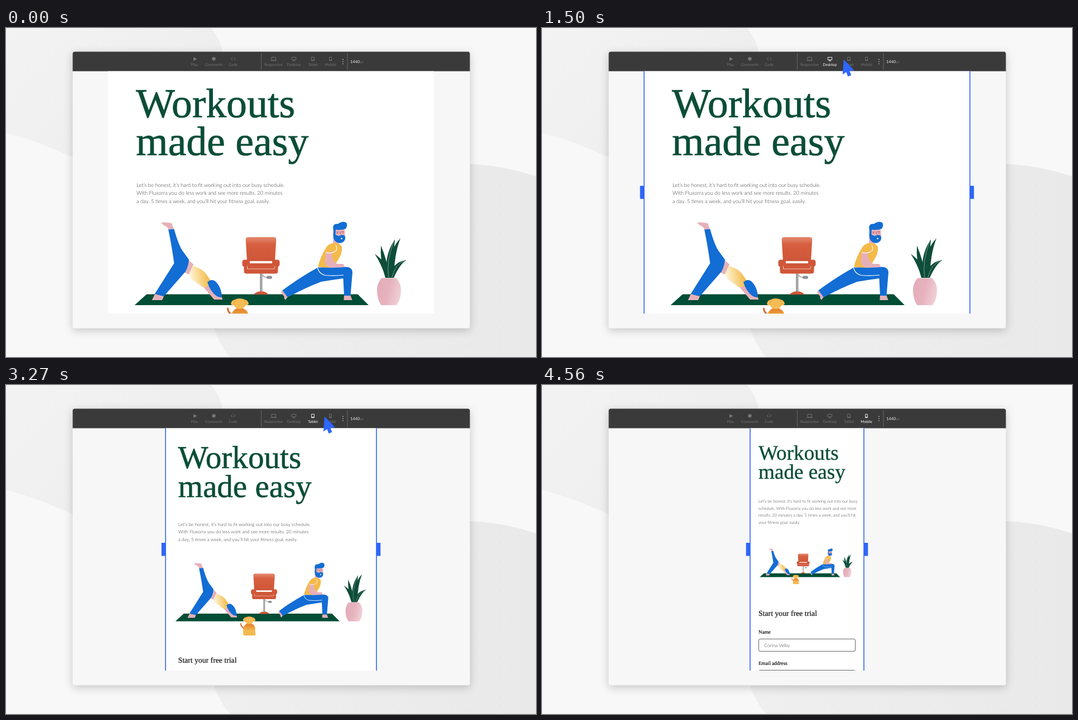
Recreate the animation shown at these times as an HTML page. Size 950 px wide and 590 px high, loop 5.25 s.

```html
<!DOCTYPE html>
<html lang="en">
<head>
<meta charset="utf-8">
<title>Responsive preview</title>
<style>
  html, body { margin: 0; width: 100%; height: 100%; overflow: hidden; background: #f8f8f8; }
  svg { display: block; }
  text { text-rendering: geometricPrecision; }
  .title { font-family: "Liberation Serif", serif; fill: #0b4d38; stroke: #0b4d38; }
  .label { font-family: "Liberation Serif", serif; fill: #111; stroke: #111; stroke-width: .2; }
  .copy { font-family: Lato, sans-serif; font-weight: 300; fill: #333; }
  .field { fill: #fff; stroke: #555; stroke-width: .9; }
  .tool { font: 6.7px Lato, sans-serif; text-anchor: middle; fill: #747474; color: #747474; }
  .tool.on { fill: #fff; color: #fff; }
  .line { fill: none; stroke: currentColor; stroke-width: .9; }
  .window { filter: drop-shadow(0 4px 8px rgba(0, 0, 0, .2)); }
</style>
</head>
<body>
<svg width="950" height="590" viewBox="0 0 950 590">
  <defs>
    <linearGradient id="veilA" x1="0" y1="0" x2="1" y2=".6">
      <stop offset="0" stop-color="#f3f3f3"/><stop offset="1" stop-color="#ededed"/>
    </linearGradient>
    <linearGradient id="veilB" x1="0" y1="0" x2="1" y2="0">
      <stop offset="0" stop-color="#efefef"/><stop offset="1" stop-color="#e9e9e9"/>
    </linearGradient>
    <linearGradient id="top" gradientUnits="userSpaceOnUse" x1="328" y1="447" x2="362" y2="441">
      <stop offset="0" stop-color="#fff8e6"/><stop offset=".35" stop-color="#fbe3ab"/><stop offset="1" stop-color="#f3bb4c"/>
    </linearGradient>
    <linearGradient id="seat" x1="0" y1="0" x2="0" y2="1">
      <stop offset="0" stop-color="#e58a70"/><stop offset=".3" stop-color="#d65f40"/><stop offset="1" stop-color="#cf5638"/>
    </linearGradient>
    <linearGradient id="pot" x1="0" y1="0" x2="1" y2=".25">
      <stop offset="0" stop-color="#e3adb8"/><stop offset=".55" stop-color="#e6b2bd"/><stop offset="1" stop-color="#efccd3"/>
    </linearGradient>
    <linearGradient id="fur" x1="0" y1="0" x2="0" y2="1">
      <stop offset="0" stop-color="#e17a2c"/><stop offset=".3" stop-color="#ec9a38"/><stop offset=".6" stop-color="#f5b950"/>
    </linearGradient>
    <clipPath id="pageClip"><rect id="clip" y="77" height="435.3"/></clipPath>

    <g id="art">
      <path fill="#004d36" d="M252 477.5H630.500L650 497H230.500Z"/>

      <!-- plant -->
      <g id="leaves" fill="#0d4d39"></g>
      <path fill="url(#pot)" d="M673 448.500H699.500Q709 459 708 473Q707 488 700 497H672.500Q666 488 665 473Q664 459 673 448.500Z"/>

      <!-- chair -->
      <path fill="none" stroke="#a3a6a6" stroke-width="4.600" d="M457.300 438V475"/>
      <path fill="none" stroke="#8f9495" stroke-width="1.400" d="M459 443Q464 448 470 447"/>
      <rect fill="#8f9495" x="467" y="444.500" width="10" height="5.500" rx="2.700"/>
      <path fill="#cf5638" d="M444 478Q447 473.500 454 472.500H461Q467 473.500 470.500 478Z"/>
      <path fill="url(#seat)" d="M434 375H480Q484.500 375 484.300 380L482 418H432L429.700 380Q429.500 375 434 375Z"/>
      <path fill="#d05739" d="M427 415.500H433.500Q437 416 437 420V422H477V420Q477 416 480.500 415.500H487Q490.500 416 490.500 420V424Q490 427.500 487.500 428V436Q487.500 440.500 483 440.500H431Q426.500 440.500 426.500 436V428Q423.500 427.500 423.500 424V420Q423.500 416 427 415.500Z"/>
      <path fill="none" stroke="#f3cfc4" stroke-width=".9" d="M432.500 427V432H481.500V427"/>

      <!-- stretching woman -->
      <g fill="#e6b0b9">
        <path d="M278 349Q286 347.500 297 350L301 361.500L291.500 362.500Q290 356.500 285 355Q280 352.500 278 349Z"/>
        <path d="M267 477L283 481L280 488H261.500Q264 483 267 477Z"/>
        <path d="M326 415L336 424L330 443L319 438Z"/>
        <path d="M351 461L370 460L380 477L388 484.500V487H373Z"/>
      </g>
      <path fill="url(#top)" d="M334.500 426.500Q350 431 357 439Q365 449 371 461Q362 464 353 465Q344 458 332 450L327.500 442Z"/>
      <path fill="#126dd4" d="M291 361.500L301.200 360.500Q309 388 316 399L328 415.500Q326 434 318 441L283 481L266.500 477L301.300 422Q298 396 291 361.500Z"/>
      <path fill="#126dd4" d="M361 456Q369 448 377 456Q386 465 387 482.500Q382 484 376.500 480Q366 472 361 456Z"/>

      <!-- lunging man -->
      <g fill="#e6b0b9">
        <path d="M495 470L505 482L501 487.500Q498 486 498.500 481Q494 477 493.500 473Z"/>
        <path d="M606 478H617L620.500 488H605.500Z"/>
        <path d="M587 361L606.500 359L608 374L597 386L600 392L586 391Z"/>
      </g>
      <path fill="#126dd4" d="M559 429.500L608 428.500Q620.500 428 621 438L617.500 480H606L604.500 449Q583 452 565 455Q536 466 505 483L495.500 470.500Q527 447 559 429.500Z"/>
      <path fill="none" stroke="#fff" stroke-width="1.200" d="M558.500 430Q561 441 572 443.500Q590 445 605 443"/>
      <path fill="#f4ba4a" d="M575 392Q580 386 588 385.500Q598 386 602 392Q603 404 597 413Q590 426 582 430L559 428.500Q564 408 575 392Z"/>
      <path fill="#e6b0b9" d="M573 403L584.500 401Q583 412 589 420L594 423H604Q607 425 606.500 429L584 430Q573 429 571.500 419Z"/>
      <path fill="none" stroke="#fff" stroke-width="1.100" d="M573 402Q583 406 592 399Q594 394 591 389"/>
      <path fill="#126dd4" d="M587 363Q584.500 354 590 351.500Q595 352 599 349Q604 346 610 349Q613 354 609 360Q601 363 591 361.500L590.500 370Q596 375 600 371.500Q605 370 608 374Q609 382 602 385Q594 387 589 381Q585.500 376 587 363Z"/>
      <path fill="none" stroke="#a4475e" stroke-width=".9" d="M592 366H596M601 365.500H606M598.500 365L600 370M594 367V369M604 367V369"/>
      <circle cx="601.500" cy="377.500" r="1.500" fill="#fff"/>

      <!-- dog -->
      <path fill="none" stroke="#d9672c" stroke-width="3" stroke-linecap="round" d="M397.500 503Q398 511 409 518"/>
      <path fill="url(#fur)" d="M405 511Q410 502 419 502Q431 503 434 512L435 533.500H405Q402 523 405 511Z"/>
      <path fill="#f5bb54" d="M410 487Q419 483 428 487Q434 488 435 495Q432 499 429 497Q428 503.500 419 504Q410 503.500 409 497Q406 499 403 495Q404 488 410 487Z"/>
      <path fill="none" stroke="#e0952f" stroke-width=".8" d="M411 487Q408 491 409 497M427 487Q430 491 429 497"/>
    </g>
  </defs>

  <rect width="950" height="590" fill="#f8f8f8"/>
  <path fill="url(#veilA)" d="M0 0H367Q383 17 389 44L300 200L120 232Q60 204 0 188Z"/>
  <path fill="url(#veilB)" d="M372 536Q383 570 402 590H950V266Q890 246 830 244Z"/>

  <g class="window">
    <rect x="119.500" y="42.500" width="712" height="496" rx="4" fill="#f7f7f7"/>
  </g>
  <path fill="#3a3a3a" d="M119.500 77.500V46.500Q119.500 42.500 123.500 42.500H827.500Q831.500 42.500 831.500 46.500V77.500Z"/>
  <path stroke="#666" d="M457.500 45V75M612 45V75"/>
  <g id="tools"></g>
  <g fill="#b5b5b5"><circle cx="604" cy="56.500" r=".9"/><circle cx="604" cy="60.300" r=".9"/><circle cx="604" cy="64.100" r=".9"/></g>
  <text x="617" y="63" fill="#e8e8e8" font-family="Lato, sans-serif" font-size="7.400">1440</text>
  <text x="634.800" y="63" fill="#777" font-family="Lato, sans-serif" font-size="6">px</text>

  <g clip-path="url(#pageClip)">
    <rect x="119" y="77.500" width="712" height="434.700" fill="#fff"/>
    <g id="layouts"></g>
  </g>
  <g id="frame" fill="#2f66f5">
    <g id="left"><rect x="-.8" y="77.500" width="1.600" height="434.700"/><rect x="-7.300" y="283" width="7.300" height="23.500" rx=".6"/></g>
    <g id="right"><rect x="-.8" y="77.500" width="1.600" height="434.700"/><rect x="0" y="283" width="7.300" height="23.500" rx=".6"/></g>
  </g>
  <path id="cursor" fill="#2f66ff" d="M0 0L19 19.500L10.500 20.500L13.500 28L7.500 30.500L4.500 22.500L-2 27Z"/>
</svg>

<script>
const $ = id => document.getElementById(id);
const LOOP = 5250, TICK = 30, CENTER = 475;

// Leaves: base, bend, tip, half width
$('leaves').innerHTML = [
  [684, 448, 680, 424, 661, 405, 7],
  [683, 448, 676, 418, 672, 390, 6],
  [688, 448, 683, 412, 697, 379, 8],
  [691, 448, 688, 402, 707, 377, 5],
  [691, 448, 697, 420, 718, 416, 6],
].map(([x, y, cx, cy, tx, ty, w]) =>
  `<path d="M${x - 3} ${y}Q${cx - w} ${cy} ${tx} ${ty}Q${cx + w + 3} ${cy + 3} ${x + 4} ${y}Z"/>`
).join('') + '<path fill="none" stroke="#dfeae4" stroke-width=".5" d="M686 447Q681 420 695 383M692 447Q697 424 715 417"/>';

const tools = [
  ['Play', 338, '<path d="M336 52L342.500 55.500L336 59Z"/>'],
  ['Comments', 372.500, '<circle cx="372.500" cy="55.300" r="3.300"/>'],
  ['Code', 407, '<path class="line" d="M406 52.800L403.300 55.300L406 57.800M408.200 52.800L410.900 55.300L408.200 57.800"/>'],
  ['Responsive', 479.500, '<path class="line" d="M476 52.500H483.500V58H476ZM474.500 58.500H485"/>'],
  ['Desktop', 516, '<path class="line" d="M512.300 52.500H519.700V57H512.300ZM516 57V59M513.700 59H518.300"/>'],
  ['Tablet', 550, '<path class="line" d="M547.600 52.300H552.400V58.700H547.600ZM547.600 57.700H552.400"/>'],
  ['Mobile', 581.500, '<path class="line" d="M579.700 52.300H583.300V58.700H579.700ZM579.700 57.700H583.300"/>'],
];
$('tools').innerHTML = tools.map(([name, x, icon]) =>
  `<g class="tool" id="${name}">${icon}<text x="${x}" y="67.500">${name}</text></g>`).join('');

const lines = (cls, size, x, y, step, rows, extra = '') => rows.map((row, i) =>
  `<text class="${cls}" font-size="${size}" x="${x}" y="${y + i * step}" ${extra}>${row}</text>`).join('');
const title = (size, x, y, step) =>
  lines('title', size, x, y, step, ['Workouts', 'made easy'], `stroke-width="${size * .01}"`);
const art = (x, y, s) => `<use href="#art" transform="translate(${x} ${y}) scale(${s})"/>`;
const wide = [
  'Let’s be honest, it’s hard to fit working out into our busy schedule.',
  'With Fluxorra you do less work and see more results. 20 minutes',
  'a day, 5 times a week, and you’ll hit your fitness goal, easily.',
];
const narrow = [
  'Let’s be honest, it’s hard to fit working out into our busy',
  'schedule. With Fluxorra you do less work and see more',
  'results. 20 minutes a day, 5 times a week, and you’ll hit',
  'your fitness goal, easily.',
];
const trial = (x, y) => lines('label', 13.75, x, y, 0, ['Start your free trial']);
const field = y => `<rect class="field" x="388.500" y="${y}" width="173" height="22" rx="2.500"/>`;

const layouts = [
  title(73.8, 233, 160, 68) + lines('copy', 9.4, 234, 284.6, 14.5, wide) + art(0, 0, 1),
  title(57.1, 308.5, 149, 52.3) + lines('copy', 8.4, 308.8, 252.8, 13.5, wide) +
    art(141.9, 75, .7017) + trial(308.5, 497.8),
  title(37.2, 388, 133.5, 34) + lines('copy', 7.4, 388, 211.4, 12.4, narrow) +
    art(311.1, 173.8, .3435) + trial(388, 414.2) +
    lines('label', 9.2, 388, 446, 56, ['Name', 'Email address']) +
    field(455.5) + field(511.5) + lines('copy', 8.5, 398.3, 469.8, 0, ['Corina Velby']),
];
$('layouts').innerHTML = layouts.map(html => `<g>${html}</g>`).join('');
const views = [...$('layouts').children];

const inOut = u => u < .5 ? 4 * u ** 3 : 1 - 4 * (1 - u) ** 3;
const out = u => 1 - (1 - u) ** 3;
const part = (t, from, to) => Math.min(1, Math.max(0, (t - from) / (to - from)));

// Cursor moves: start, end, x, y
const home = [782, 604];
const moves = [
  [0, 330, 513, 56.5],
  [1412, 1552, 548, 56.5],
  [3190, 3330, 581.5, 56.5],
  [4350, 4560, ...home],
];
// Clicks: time, half width of the page
const clicks = [
  { at: 360, half: 292, tool: 'Desktop' },
  { at: 1590, half: 189, tool: 'Tablet' },
  { at: 3360, half: 102, tool: 'Mobile' },
];

function draw(now) {
  const t = Math.floor((now % LOOP) / TICK) * TICK;

  let [x, y] = home;
  for (const [from, to, tx, ty] of moves) {
    const k = inOut(part(t, from, to));
    x += (tx - x) * k;
    y += (ty - y) * k;
  }
  $('cursor').setAttribute('transform', `translate(${x} ${y})`);

  let half = clicks[0].half, active = -1;
  clicks.forEach((c, i) => {
    if (t >= c.at) active = i;
    half += (c.half - half) * out(part(t, c.at, c.at + 300));
  });
  clicks.forEach((c, i) => $(c.tool).classList.toggle('on', i === active));
  views.forEach((v, i) => v.style.display = i === Math.max(0, active) ? '' : 'none');

  $('frame').style.display = active < 0 ? 'none' : '';
  $('left').setAttribute('transform', `translate(${CENTER - half})`);
  $('right').setAttribute('transform', `translate(${CENTER + half})`);
  $('clip').setAttribute('x', CENTER - half);
  $('clip').setAttribute('width', 2 * half);
}

let start;
function tick(now) {
  start ??= now;
  draw(now - start);
  requestAnimationFrame(tick);
}
draw(0);
requestAnimationFrame(tick);
</script>
</body>
</html>
```
